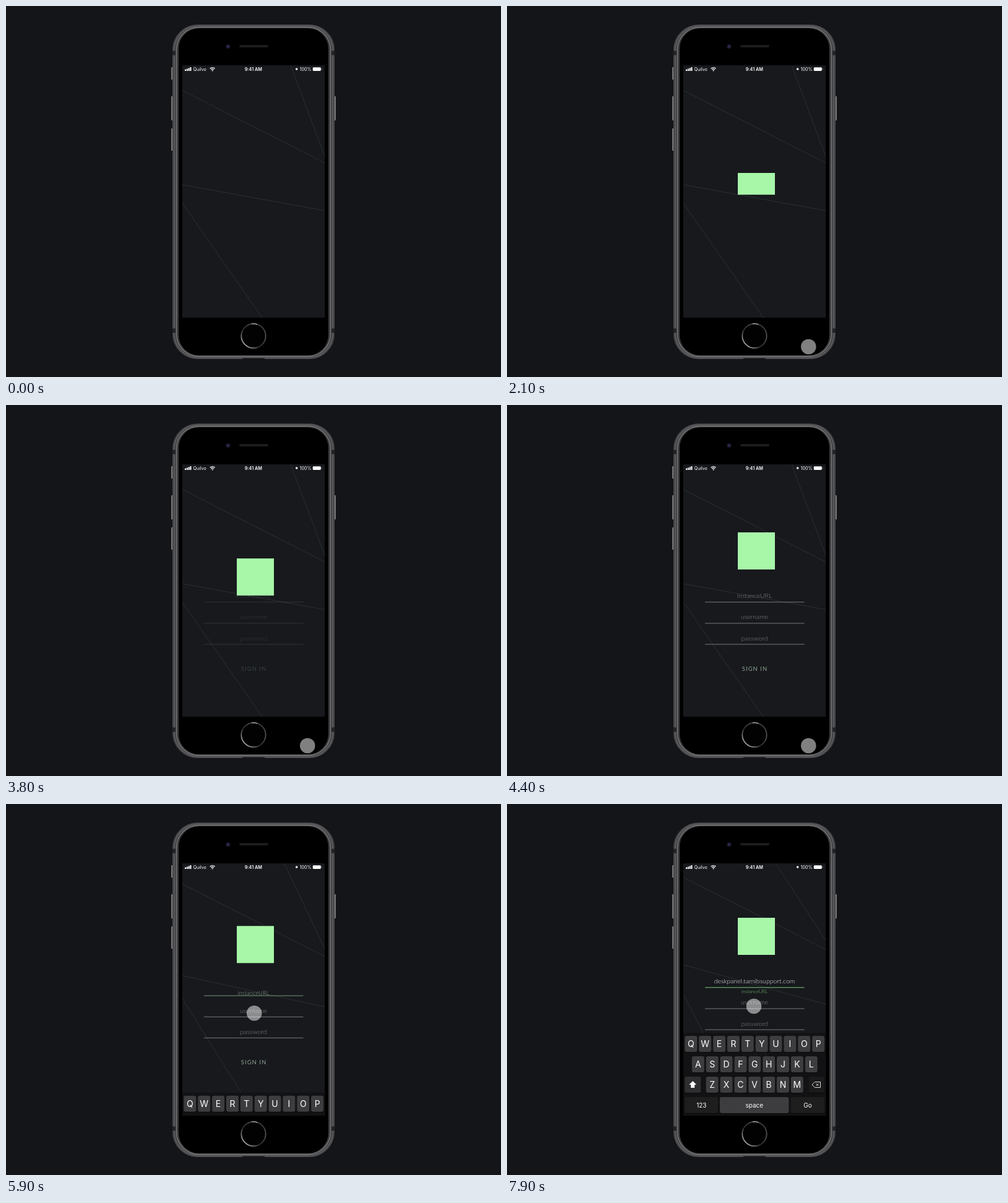
These frames come from a looping animation (800 px wide and 600 px high, 8000 ms). An HTML page:

```html
<!DOCTYPE html>
<html lang="en">
<head>
<meta charset="utf-8">
<title>Sign-in flow</title>
<style>
  html, body { margin: 0; width: 800px; height: 600px; overflow: hidden; background: #141519; }
  svg { display: block; }
  text { text-anchor: middle; }
  .status { font: 400 7.2px Inter, sans-serif; fill: #fff; }
  .form { font: 300 10.5px Lato, sans-serif; fill: #85878a; }
  .form path { stroke: #77797b; }
  .keys { font: 400 14px Inter, sans-serif; fill: #fff; }
  .keys .small { font-size: 10px; }
</style>
</head>
<body>
<svg width="800" height="600" viewBox="0 0 800 600">
  <defs>
    <linearGradient id="ring" x1="0" y1="1" x2="1" y2="0">
      <stop offset="0" stop-color="#222"/><stop offset=".15" stop-color="#a0a0a0"/>
      <stop offset=".4" stop-color="#2c2c2c"/><stop offset=".75" stop-color="#555"/>
      <stop offset="1" stop-color="#222"/>
    </linearGradient>
    <clipPath id="screen"><rect x="285" y="96" width="230.5" height="408"/></clipPath>
  </defs>

  <!-- phone -->
  <path d="M268 99v20M268 146v39M268 198v36M532 146v39" stroke="#77777a" stroke-width="2"/>
  <rect x="269.5" y="30.5" width="261" height="540" rx="40" fill="#39393b" stroke="#4c4c4f"/>
  <rect x="272" y="32.5" width="256" height="536" rx="38" fill="none" stroke="#59595c" stroke-width="2.5"/>
  <rect x="275.5" y="34.5" width="249" height="532" rx="36" fill="none" stroke="#777679" stroke-width="1.5"/>
  <path d="M269 76h5M269 525h5M526 76h5M526 525h5" stroke="#232325" stroke-width="7"/>
  <rect x="279" y="36" width="242" height="529" rx="33"/>
  <path d="M382 570.5h36" stroke="#161618" stroke-width="2"/>
  <circle cx="359" cy="65.5" r="3.5" fill="#1b1a30"/>
  <circle cx="358.6" cy="65.5" r="1.5" fill="#33335a"/>
  <path d="M379 65h43" stroke="#1c1c1d" stroke-width="4" stroke-linecap="round"/>
  <circle cx="400" cy="533.5" r="19.7" fill="#020202" stroke="url(#ring)" stroke-width="1.8"/>
  <path d="M397 514a20 20 0 0 1 9 1" fill="none" stroke="#999" stroke-width="1.5"/>

  <g clip-path="url(#screen)">
    <rect x="285" y="96" width="230.5" height="408" fill="#17191d"/>
    <path id="web" fill="none" stroke="#323438" stroke-width=".8"/>

    <g id="content">
      <rect id="logo" x="373" y="270" width="60" fill="#a8f7a9"/>
      <g id="form" class="form">
        <path id="urlLine" d="M320 318.8h160.5"/>
        <path d="M320 353h160.5M320 387h160.5"/>
        <text id="urlLabel" x="400">instanceURL</text>
        <text id="url" x="400" y="312.3" fill="#f0f0f0">deskpanel.tarnibsupport.com</text>
        <path id="caret" d="M400.3 304.5v9.5" style="stroke:#ddd"/>
        <text x="400" y="346.3">username</text>
        <text x="400" y="380.8">password</text>
        <text x="400.5" y="429.5" style="font-size:9.5px;font-weight:400;letter-spacing:1px;fill:#8ea391">SIGN IN</text>
      </g>
    </g>

    <g id="keyboard" class="keys">
      <rect x="285" y="370" width="231" height="135" fill="#131314" fill-opacity=".94"/>
    </g>
  </g>

  <!-- status bar -->
  <g class="status">
    <path d="M290 105v-2.5M292.8 105v-3.6M295.6 105v-4.8M298.4 105v-6" stroke="#fff" stroke-width="2"/>
    <text x="313.2" y="104.7">Quilvo</text>
    <path d="M329.6 101.2a5.7 5.7 0 0 1 8 0M331.3 103a3.3 3.3 0 0 1 4.6 0" fill="none" stroke="#fff" stroke-width="1.3"/>
    <circle cx="333.6" cy="104.5" r="1"/>
    <text x="399.8" y="104.7" font-weight="600">9:41 AM</text>
    <circle cx="469.7" cy="102" r="1.8"/>
    <text x="484" y="104.7">100%</text>
    <rect x="495.8" y="99.2" width="13" height="5.8" rx="1.3"/>
    <path d="M510 101v2" stroke="#888"/>
  </g>

  <circle id="pointer" r="12.3" fill="#fff" fill-opacity=".5"/>
</svg>

<script>
const LOOP = 8000;
const el = Object.fromEntries([...document.querySelectorAll('svg [id]')].map(e => [e.id, e]));
const set = (node, attrs) => { for (const name in attrs) node.setAttribute(name, attrs[name]); };
const add = (tag, attrs, text = '') => {
  const node = document.createElementNS('http://www.w3.org/2000/svg', tag);
  set(node, attrs);
  node.textContent = text;
  el.keyboard.append(node);
};

const mix = (a, b, k) => a + (b - a) * k;
const ease = k => k < .5 ? 2 * k * k : 1 - 2 * (1 - k) ** 2;
const span = (t, from, to) => ease(Math.min(1, Math.max(0, (t - from) / (to - from))));
const blend = (a, b, k) => `rgb(${a.map((v, i) => Math.round(mix(v, b[i], k)))})`;

// keyboard
function key(x, y, width, label = '', fill = '#3d3d3f', small = false) {
  add('rect', { x, y: y + 1, width, height: 26, rx: 3, fill: '#080808' });
  add('rect', { x, y, width, height: 26, rx: 3, fill });
  add('text', { x: x + width / 2, y: y + (small ? 16.6 : 18), class: small ? 'small' : '' }, label);
}
[['QWERTYUIOP', 287.3], ['ASDFGHJKL', 298.8], ['ZXCVBNM', 321.6]].forEach(([letters, x], row) =>
  [...letters].forEach((c, i) => key(x + i * 22.87, 375 + row * 33, 20, c)));
key(287.3, 441, 26, '', '#2e2e30');
key(487.3, 441, 26, '', '#1a1a1b');
key(287.3, 474, 54, '123', '#1e1e1f', true);
key(344, 474, 111.5, 'space', '#3d3d3f', true);
key(458.7, 474, 54.5, 'Go', '#1e1e1f', true);
add('path', { d: 'M300.2 448l6 6h-3v5h-6v-5h-3z' });
add('path', {
  d: 'M497.5 449.5h9v9h-9l-4.5-4.5zM499.5 452l4 4M503.5 452l-4 4',
  fill: 'none', stroke: '#ddd', 'stroke-width': 1
});

// background lines: x1, y1, x2, y2 before and after the keyboard opens
const web = [
  [[285, 136.5, 515.5, 254], [285, 118.5, 515.5, 235.5]],
  [[460, 96, 515.5, 244], [434, 96, 515.5, 221]],
  [[285, 289, 515.5, 331], [285, 260, 515.5, 324]],
  [[285, 319, 414, 504], [285, 308, 387, 504]]
];

// pointer moves: start, end, x, y
const moves = [[400, 1200, 487.3, 551], [4650, 5450, 402, 311], [5600, 6550, 398.2, 447], [7400, 7900, 399, 327]];

function draw(t) {
  const open = span(t, 5500, 6400);
  const rise = span(t, 3450, 4300);
  const focus = span(t, 5600, 6300);

  set(el.web, { d: web.map(([a, b]) => {
    const [x1, y1, x2, y2] = a.map((v, i) => mix(v, b[i], open));
    return `M${x1} ${y1}L${x2} ${y2}`;
  }).join('') });

  set(el.logo, {
    y: 270 - 64 * rise,
    height: 28 * span(t, 380, 1200) + 32 * span(t, 1850, 2600),
    opacity: mix(.85, 1, span(t, 1350, 1700))
  });
  set(el.content, { transform: `translate(0 ${-22 * open})` });
  set(el.form, { opacity: span(t, 3450, 4400) });

  const green = [126, 200, 124];
  el.urlLine.style.stroke = blend([119, 121, 123], green, focus);
  el.urlLabel.style.fontSize = mix(10.5, 7.9, focus) + 'px';
  set(el.urlLabel, { y: mix(312.3, 328.3, focus), fill: blend([133, 135, 138], green, focus) });
  set(el.url, { opacity: span(t, 6850, 7000) });
  set(el.caret, { opacity: t > 6300 && t < 6900 ? 1 : 0 });
  set(el.keyboard, { transform: `translate(0 ${135 * (1 - span(t, 5600, 6400))})` });

  let x = 769.5, y = 551;
  for (const [from, to, toX, toY] of moves) {
    const k = span(t, from, to);
    x = mix(x, toX, k);
    y = mix(y, toY, k);
  }
  set(el.pointer, { cx: x, cy: y, opacity: t < 400 ? 0 : 1 });
}

function tick() {
  draw(performance.now() % LOOP);
  requestAnimationFrame(tick);
}
tick();
</script>
</body>
</html>
```
